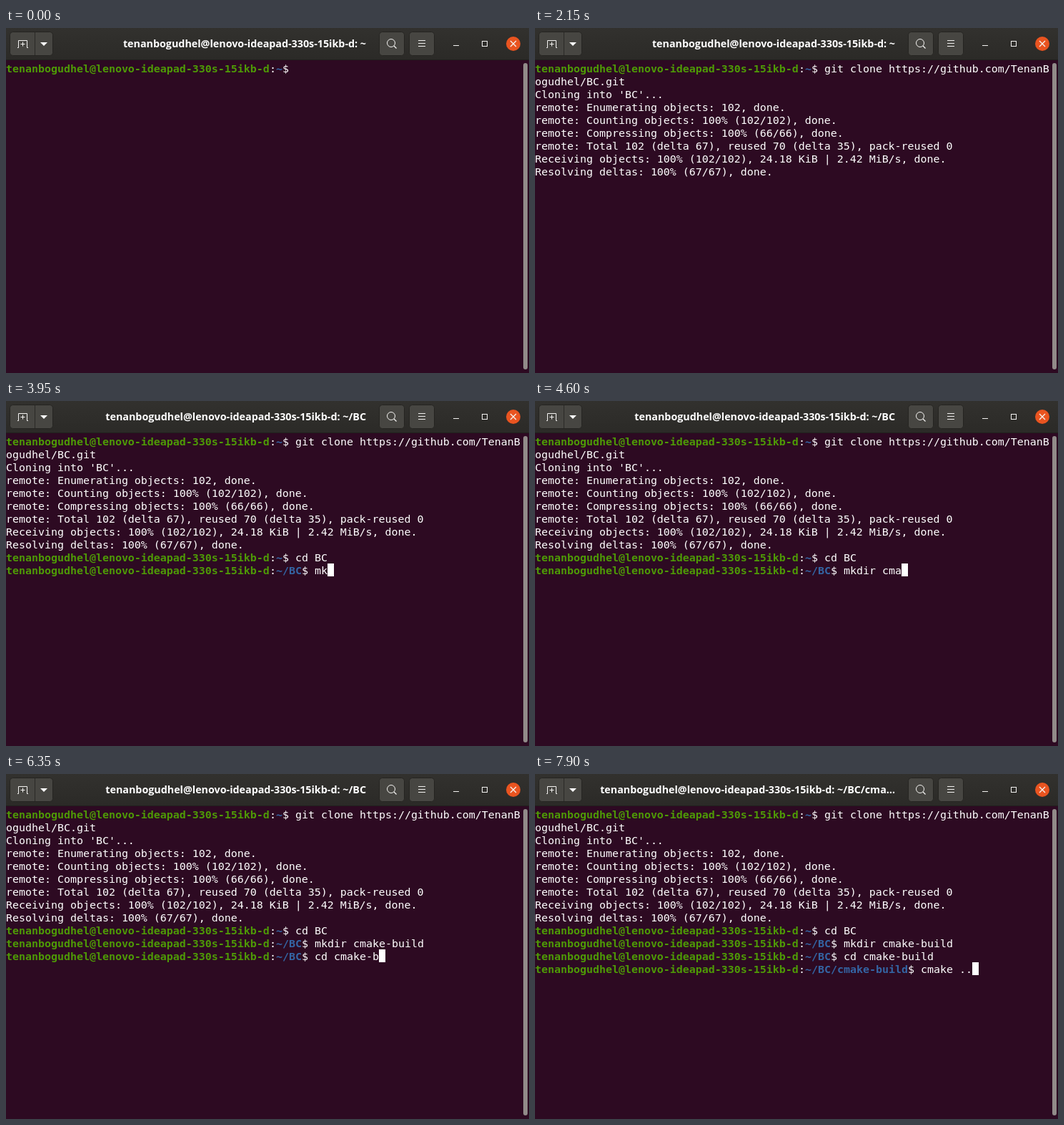
An HTML page for the animation above (8 s loop, 732 by 482 pixels).

```html
<!DOCTYPE html>
<html lang="en">
<head>
<meta charset="utf-8">
<title>Terminal</title>
<style>
  html, body { margin: 0; width: 100%; height: 100%; overflow: hidden; background: #2d0a22; }
  svg { display: block; }
  text { white-space: pre; fill: #fff; }
  #title { font: bold 14.3px "Open Sans", "Noto Sans", sans-serif; }
  #screen { font: 14.95px "DejaVu Sans Mono", "Noto Sans Mono", monospace; }
  .user { fill: #4e9a06; font-weight: bold; }
  .path { fill: #3465a4; font-weight: bold; }
  .button { fill: #474642; stroke: #252421; }
  .icon { fill: none; stroke: #f4f3f1; }
</style>
</head>
<body>
<svg width="732" height="482" viewBox="0 0 732 482">
  <defs>
    <linearGradient id="bar" x2="0" y2="1">
      <stop offset="0" stop-color="#32312e"/>
      <stop offset="1" stop-color="#2b2a27"/>
    </linearGradient>
  </defs>
  <rect width="732" height="482" fill="#2d0a22"/>
  <rect width="732" height="45" fill="url(#bar)"/>
  <rect y="44" width="732" height="1" fill="#21201e"/>

  <rect class="button" x="5.5" y="5.5" width="60" height="33" rx="4"/>
  <path d="M40.5 6V38" stroke="#2a2926"/>
  <path class="icon" d="M16 27.5H17.5V17.5H29.5V27.5H31M20.5 22.5H26.5M23.5 19.5V25.5"/>
  <path d="M48 20H58L53 25Z" fill="#fff"/>

  <rect class="button" x="522.5" y="5.5" width="35" height="33" rx="4"/>
  <circle class="icon" cx="539" cy="21" r="5.5"/>
  <path class="icon" d="M543 25L546.5 28.5" stroke-width="1.3"/>

  <rect class="button" x="564.5" y="5.5" width="35" height="33" rx="4"/>
  <path class="icon" d="M577 17.5H587M577 21.5H587M577 25.5H587"/>

  <path class="icon" d="M626 24.5H634"/>
  <rect class="icon" x="666.5" y="18.5" width="7" height="7"/>
  <circle cx="710" cy="22" r="10" fill="#e95420"/>
  <path class="icon" d="M706 18L714 26M714 18L706 26" stroke-width="1.3"/>

  <text id="title" x="504" y="27" text-anchor="end"></text>
  <g id="screen"></g>
  <rect id="cursor" width="9" height="18" fill="#fff"/>
  <rect x="724" y="49" width="6" height="428" rx="3" fill="#918b89"/>
</svg>
<script>
const LOOP = 8000, STEP = 50, BLINK = 587.5;
const CELL = 9, LINE = 18, TOP = 47, COLS = 80;
const USER = 'tenanbogudhel@lenovo-ideapad-330s-15ikb-d';

// A burst types its text evenly, first character at "from", last one at "to".
const burst = (text, from, to = from) => ({ text, from, to });
const prompt = (at, path, ...bursts) => ({ at, path, bursts });
const output = (at, ...lines) => ({ at, lines });

const session = [
  prompt(0, '~',
    burst('git ', 250, 350),
    burst('clone ', 600, 850),
    burst('https://github.com/TenanBogudhel/BC.git', 1150)),
  output(1500),
  output(1550, "Cloning into 'BC'..."),
  output(2150,
    'remote: Enumerating objects: 102, done.',
    'remote: Counting objects: 100% (102/102), done.',
    'remote: Compressing objects: 100% (66/66), done.',
    'remote: Total 102 (delta 67), reused 70 (delta 35), pack-reused 0',
    'Receiving objects: 100% (102/102), 24.18 KiB | 2.42 MiB/s, done.',
    'Resolving deltas: 100% (67/67), done.'),
  prompt(2400, '~', burst('cd ', 2600, 2700), burst('BC', 3050, 3150)),
  prompt(3350, '~/BC',
    burst('mkdir', 3850, 4200),
    burst(' cmake-', 4400, 4800),
    burst('build', 5000, 5300)),
  prompt(5350, '~/BC',
    burst('cd ', 5550, 5650),
    burst('cma', 5800, 5950),
    burst('ke-', 6100, 6200),
    burst('build', 6350, 6700)),
  prompt(6850, '~/BC/cmake-build',
    burst('cm', 7300, 7350),
    burst('ake ', 7500, 7700),
    burst('..', 7850, 7900))
];

const [title, screen, cursor] = ['title', 'screen', 'cursor'].map(id => document.getElementById(id));

function put(text, row, col = 0, style = '') {
  const el = document.createElementNS('http://www.w3.org/2000/svg', 'text');
  el.setAttribute('x', col * CELL);
  el.setAttribute('y', TOP + row * LINE + 15);
  el.setAttribute('class', style);
  el.textContent = text;
  screen.append(el);
}

function typed({ text, from, to }, t) {
  if (t < from) return '';
  if (t >= to) return text;
  return text.slice(0, 1 + Math.floor((t - from) / (to - from) * (text.length - 1)));
}

// Draws a prompt and returns the cell after its last character.
function drawPrompt(path, text, row) {
  const pathCol = USER.length + 1, endCol = pathCol + path.length;
  const start = endCol + 2, end = start + text.length;
  put(USER, row, 0, 'user');
  put(':', row, USER.length);
  put(path, row, pathCol, 'path');
  put('$', row, endCol);
  put(text.slice(0, COLS - start), row, start);
  put(text.slice(COLS - start), row + 1);
  return [row + Math.floor(end / COLS), end % COLS];
}

function render(t) {
  screen.replaceChildren();
  let row = 0, col = 0, path, text;
  for (const part of session) {
    if (part.at > t) break;
    if (col > 0) [row, col] = [row + 1, 0];
    text = '';
    if (part.path) {
      path = part.path;
      text = part.bursts.map(b => typed(b, t)).join('');
      [row, col] = drawPrompt(path, text, row);
    } else {
      for (const line of part.lines) put(line, row++);
    }
  }
  title.textContent = `${USER}: ${path.length > 8 ? path.slice(0, 8) + '…' : path}`;

  // The cursor blinks, but stays lit while a command is being typed.
  const lit = Math.floor((t - STEP) / BLINK) % 2 === 0;
  cursor.setAttribute('x', col * CELL);
  cursor.setAttribute('y', TOP + row * LINE);
  cursor.setAttribute('visibility', lit || text ? 'visible' : 'hidden');
}

const startTime = performance.now();
let shown = -1;

function tick() {
  const t = Math.floor((performance.now() - startTime) % LOOP / STEP) * STEP;
  if (t !== shown) render(shown = t);
  requestAnimationFrame(tick);
}
tick();
</script>
</body>
</html>
```
